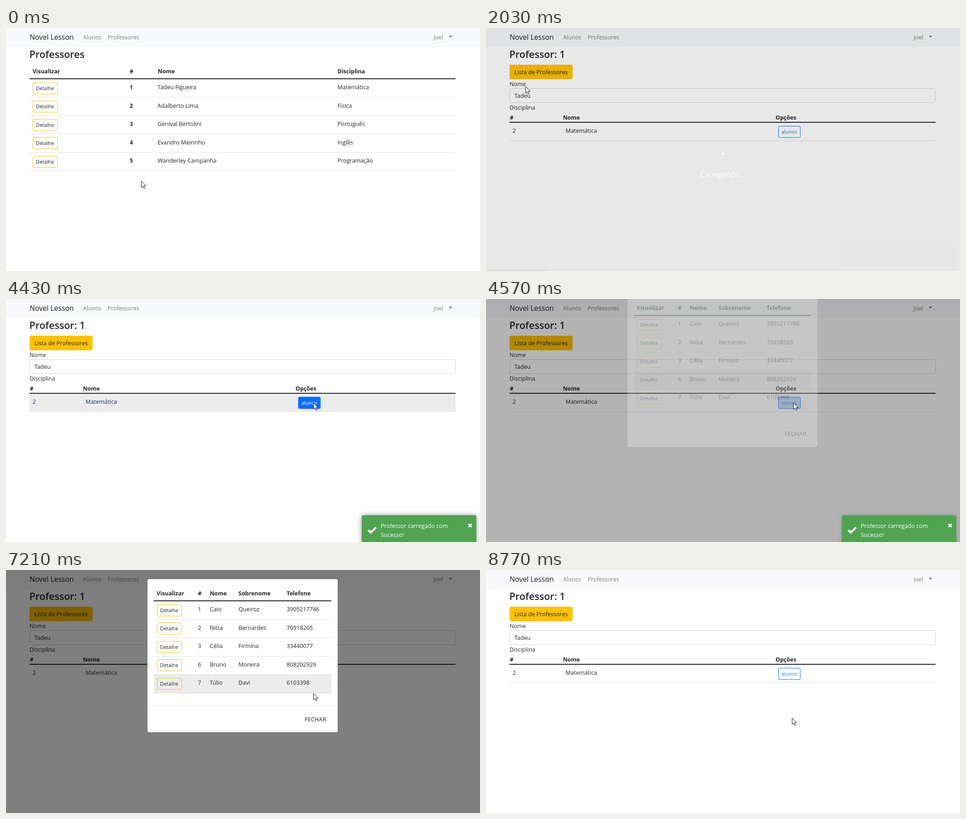
An HTML page for the animation above (9.5 s loop, 1046 by 536 pixels).

```html
<!DOCTYPE html>
<html lang="pt">
<head>
<meta charset="utf-8">
<title>Professores</title>
<style>
html, body { margin: 0; width: 100%; height: 100%; overflow: hidden; background: #fff; }
svg { display: block; width: 1046px; height: 536px; font-family: "Open Sans", "Noto Sans", sans-serif; cursor: default; }
</style>
</head>
<body>
<svg id="stage" viewBox="0 0 1046 536"></svg>
<script>
const LOOP = 9500, ROW = 40.5, SIZE = 12.65;
const INK = '#212529', RULE = '#dee2e6', YELLOW = '#ffc107', BLUE = '#0d6efd';

const teachers = [
  ['Tadeu Figueira', 'Matemática'],
  ['Adalberto Lima', 'Física'],
  ['Genival Bertolini', 'Português'],
  ['Evandro Meirinho', 'Inglês'],
  ['Wanderley Campanha', 'Programação']
];
const students = [
  [1, 'Caio', 'Queiroz', '3905217746'],
  [2, 'Nilza', 'Bernardes', '70918265'],
  [3, 'Célia', 'Firmina', '33440077'],
  [6, 'Bruno', 'Moreira', '808202929'],
  [7, 'Túlio', 'Davi', '6103398']
];

// Pointer stops: time, x, y
const path = [
  [440, 298, 337], [580, 282, 338], [720, 250, 335], [860, 200, 319], [1060, 145, 268],
  [1270, 91, 196], [1410, 89, 166], [1480, 88, 150], [1700, 87, 129],
  [3000, 87, 129], [3300, 200, 150], [3600, 450, 205], [3850, 630, 236], [3960, 672, 235], [4100, 678, 229],
  [6830, 678, 229], [7000, 678, 244], [7210, 678, 272], [7500, 676, 315], [7680, 675, 326]
];

const ramp = (t, a, b) => Math.min(1, Math.max(0, (t - a) / (b - a)));
const easeOut = k => 1 - (1 - k) ** 2;

function pointer(t) {
  const i = path.findIndex(p => p[0] > t);
  if (i === 0) return path[0].slice(1);
  if (i < 0) return path[path.length - 1].slice(1);
  const [a, b] = [path[i - 1], path[i]], k = ramp(t, a[0], b[0]);
  return [a[1] + (b[1] - a[1]) * k, a[2] + (b[2] - a[2]) * k];
}

const rect = (x, y, w, h, fill, more = '') =>
  `<rect x="${x}" y="${y}" width="${w}" height="${h}" fill="${fill}" ${more}/>`;
const text = (x, y, s, fill = INK, size = SIZE, weight = 400, more = '') =>
  `<text x="${x}" y="${y}" fill="${fill}" font-size="${size}" font-weight="${weight}" ${more}>${s}</text>`;
const bold = (x, y, s) => text(x, y, s, INK, 12.5, 700);
const group = (s, opacity, more = '') => opacity > 0 ? `<g opacity="${opacity}" ${more}>${s}</g>` : '';
const button = (x, y, w, label, color, ink, fill) =>
  rect(x + .5, y + .5, w - 1, 25, fill, `stroke="${color}" rx="2.5"`) + text(x + 7.1, y + 17, label, ink, 11.05);
const inside = ([px, py], x, y, w, h) => px >= x && px < x + w && py >= y && py < y + h;

// Table body: one hoverable row per entry, with a detail button in front
function rows(list, x, w, top, at, cells) {
  return list.map((item, i) => {
    const y = top + i * ROW, y0 = Math.round(y), y1 = Math.round(y + ROW), by = Math.round(y + 6.7);
    const hot = at && inside(at, x, y, w, ROW + 1);
    const over = hot && inside(at, x + 7, by, 55, 26);
    return (hot ? rect(x, y0, w, y1 - y0, '#ececec') : '') +
      rect(x, Math.round(y + ROW - 1), w, 1, RULE) +
      button(x + 7, by, 55, 'Detalhe', YELLOW, INK, over ? YELLOW : 'none') +
      cells(item, i, Math.round(y + 22.2));
  }).join('');
}

function navbar() {
  const gray = '#7c7d7d';
  return rect(0, 0, 1046, 42, '#f8f9fa') +
    text(52, 26, 'Novel Lesson', '#1a1d20', 15.85) +
    text(170, 25, 'Alunos', gray) + text(224.5, 25, 'Professores', gray) +
    text(943.5, 25, 'Joel', gray) + `<path d="M977 17h8l-4 4.2z" fill="${gray}"/>`;
}

const title = s => text(51.5, 66, s, INK, 21.6, 600);

function listPage(at) {
  return title('Professores') +
    bold(58.5, 100, 'Visualizar') + bold(273, 100, '#') + bold(335, 100, 'Nome') + bold(731.5, 100, 'Disciplina') +
    rows(teachers, 52, 940, 112.8, at, ([name, subject], i, y) =>
      bold(273, y, i + 1) + text(334.5, y, name) + text(731.5, y, subject)) +
    rect(52, 111, 940, 2, INK);
}

function detailPage(t, at) {
  const hot = t < 4520 && inside(at, 52, 208, 940, 41);
  const ink = hot ? '#1c2a63' : INK;
  const over = t < 4520 && inside(at, 645, 216, 49, 26);
  const ring = t < 4700 ? ramp(t, 4340, 4430) * .3 : 0;
  return title('Professor: 1') +
    rect(52, 81, 139, 32, YELLOW, 'rx="3"') + text(62.7, 102, 'Lista de Professores') +
    text(52, 128, 'Nome') +
    rect(52.5, 133.5, 939, 31, '#fff', 'stroke="#ced4da" rx="3"') + text(62.7, 154, 'Tadeu') +
    text(52, 180, 'Disciplina') +
    bold(52.5, 202, '#') + bold(169.7, 202, 'Nome') + bold(639, 202, 'Opções') +
    (hot ? rect(52, 208, 940, 41, '#ececec') : '') +
    rect(52, 207, 940, 2, INK) + rect(52, 248, 940, 1, RULE) +
    text(58.5, 231, '2', ink) + text(175.5, 231, 'Matemática', ink) +
    group(rect(644, 215, 51, 28, BLUE, 'rx="4"'), ring) +
    button(645, 216, 49, 'alunos', BLUE, over ? '#fff' : '#1b75d8', over ? BLUE : 'none');
}

function modal(at) {
  const head = [[332.3, 'Visualizar'], [423.5, '#'], [449.7, 'Nome'], [513, 'Sobrenome'], [619.3, 'Telefone']];
  return rect(311, 19, 422, 340, '#000', 'opacity=".2" rx="4"') + rect(312, 20, 420, 338, '#fff', 'rx="3.5"') +
    head.map(([x, s]) => bold(x, 56, s)).join('') +
    rows(students, 326, 392, 69, at, ([id, first, last, phone], i, y) =>
      text(423.5, y, id) + text(449.7, y, first) + text(513, y, last) + text(619.3, y, phone)) +
    rect(326, 67, 392, 2, INK) + rect(312, 298, 420, 1, RULE) +
    text(658.7, 334, 'FECHAR', INK, 13);
}

function toast() {
  return rect(785, 477, 253, 70, '#51a351', 'rx="3" style="filter:drop-shadow(0 0 6px #999)"') +
    text(827, 505, 'Professor carregado com', '#fff', SIZE, 500) + text(827, 525, 'Sucesso!', '#fff', SIZE, 500) +
    `<path d="M799 509.5l5.8 5.8 11.7-11.5" fill="none" stroke="#fff" stroke-width="4.3"/>` +
    `<path d="M1020.5 496l7 7m0-7l-7 7" stroke="#fff" stroke-width="2.6"/>`;
}

function loader(age) {
  return rect(0, 0, 1046, 536, '#000', 'opacity=".8"') +
    `<circle cx="522" cy="277" r="${2.5 + Math.max(0, age) * .04}" fill="#fff"/>` +
    text(522, 329, 'Carregando...', '#fff', 15.7, 400, 'text-anchor="middle"');
}

function scene(t) {
  const at = pointer(t), isList = t < 1900;
  const load = Math.min(ramp(t, 2000, 2280), ramp(t, 2290, 2100) * .4);
  const backdrop = Math.min(ramp(t, 4470, 4640), ramp(t, 8700, 8480)) * .5;
  const shown = t < 6000 ? easeOut(ramp(t, 4530, 4840)) : 1 - easeOut(ramp(t, 8130, 8460));
  const noted = Math.min(ramp(t, 2028, 2320), ramp(t, 5860, 5520));
  return navbar() + (isList ? listPage(at) : detailPage(t, at)) +
    group(loader(t - 2030), load) +
    (t > 1960 && t < 2120 ? rect(0, 534, 140, 2, '#f1f1f1') + rect(0, 534, 140, 1, '#c4c4c4') : '') +
    group(rect(0, 0, 1046, 536, '#000'), backdrop) +
    group(modal(t < 8130 ? at : null), shown, `transform="translate(0 ${-42 * (1 - shown)})"`) +
    group(toast(), noted) +
    `<path transform="translate(${at.map(v => Math.round(v) + .5).join(' ')})" fill="#fff" stroke="#111"
      d="M0 0V14L3.3 11 5.6 16.2 7.9 15.2 5.7 10.2H10Z"/>`;
}

const stage = document.getElementById('stage');
function draw() {
  stage.innerHTML = scene(performance.now() % LOOP);
  requestAnimationFrame(draw);
}
draw();
</script>
</body>
</html>
```
